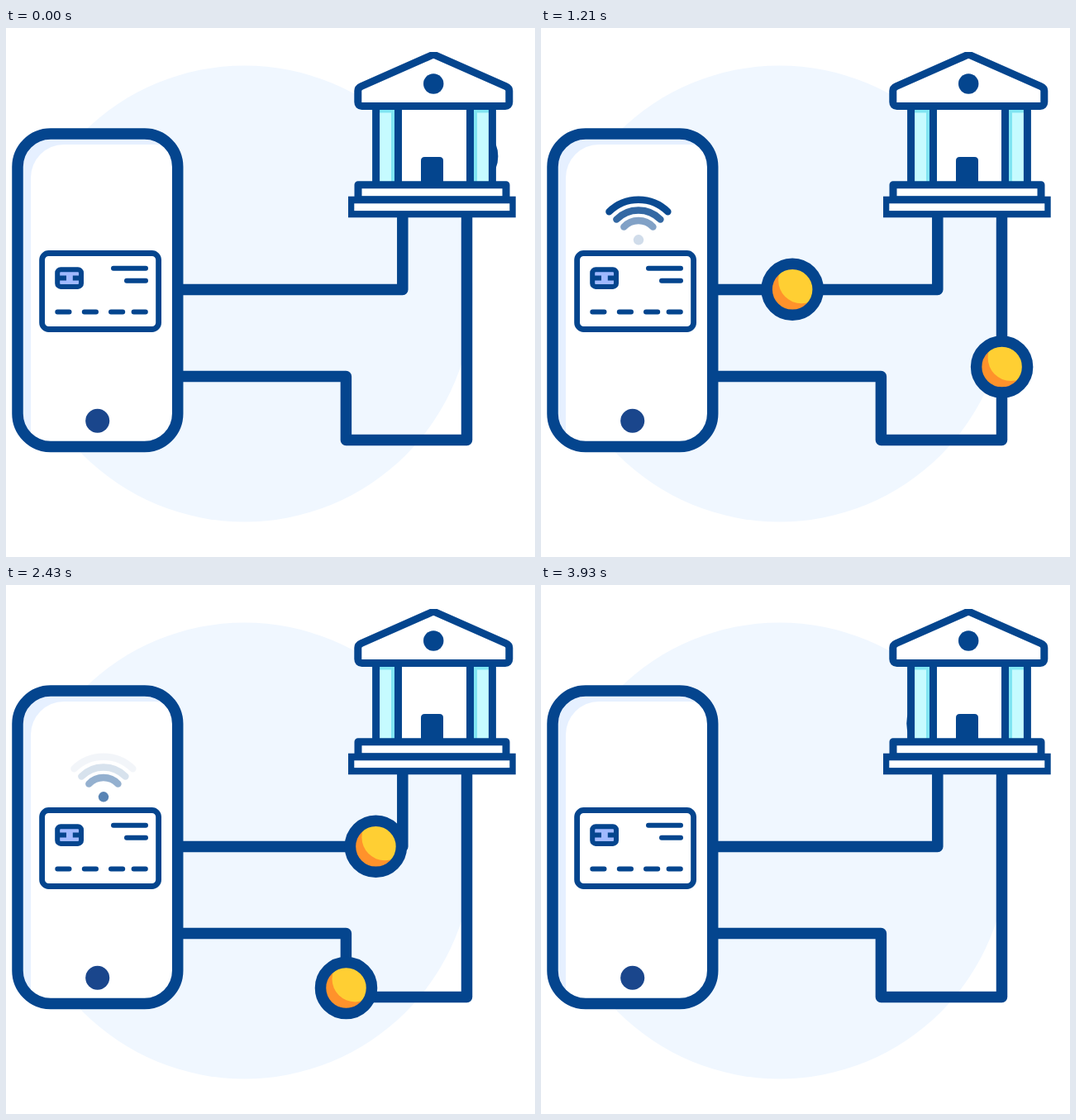
Write an HTML page that moves like this. It is 640 px wide and 640 px high and loops after 4000 ms.

```html
<!DOCTYPE html>
<html lang="en">
<head>
<meta charset="utf-8">
<title>Card payment</title>
<style>
  html, body { margin: 0; width: 100%; height: 100%; overflow: hidden; background: #fff; }
  svg { display: block; width: 100vw; height: 100vh; }
  .line { fill: none; stroke: #04458e; stroke-linejoin: round; }
  .white { fill: #fff; }
  .navy { fill: #04458e; }
  .cap { stroke-linecap: round; }
</style>
</head>
<body>
<svg viewBox="0 0 640 640">
  <defs>
    <clipPath id="face"><circle r="25"/></clipPath>
    <clipPath id="roof"><path d="M414 29H620V110H414Z"/></clipPath>
    <g id="coin">
      <circle r="25" fill="#ff922b"/>
      <circle cx="11" cy="-11" r="28" fill="#ffcf33" clip-path="url(#face)"/>
      <circle r="31" class="line" stroke-width="13.5"/>
    </g>
  </defs>

  <circle cx="288.5" cy="321.5" r="276" fill="#f0f7ff"/>

  <g class="line" stroke-width="13.5">
    <path d="M200 316.4H479.8V200"/>
    <path d="M200 421.4H411.4V498.6H557.5V200"/>
  </g>

  <use id="pay" href="#coin"/>
  <use id="receipt" href="#coin"/>

  <g id="phone">
    <rect x="14" y="128" width="193.7" height="378.5" rx="40" fill="#e6f0ff"/>
    <path class="white" d="M30 500V181A40 40 0 0 1 70 141H180Q207 141 207 172V466A40 40 0 0 1 168 506H54Z"/>
    <rect class="line" x="14" y="128" width="193.7" height="378.5" rx="40" stroke-width="13.5"/>
    <circle cx="110.7" cy="475.3" r="14.5" fill="#1a468c"/>
  </g>

  <g id="wifi" class="line cap" stroke-width="8.4">
    <circle cx="118" cy="256.3" r="6.2" class="navy" stroke="none"/>
    <path d="M100.3 240.6A24.2 24.2 0 0 1 135.5 240.6"/>
    <path d="M91.3 231.6A37.4 37.4 0 0 1 144.5 231.6"/>
    <path d="M82.4 222.2A50.7 50.7 0 0 1 153.4 222.2"/>
  </g>

  <g id="card">
    <rect x="43.6" y="272.5" width="141" height="92" rx="8" class="line" style="fill:#fff" stroke-width="6.8"/>
    <rect x="62.2" y="292.3" width="28.8" height="20.6" rx="4" class="line" style="fill:#a0b9ff" stroke-width="6"/>
    <path class="line" stroke-width="6" d="M64 302.6H73M80.8 302.6H89"/>
    <path class="line cap" stroke-width="6" d="M130 290.8H169M146 305.7H169M62.3 343.5H76.5M94.8 343.5H109M127 343.5H141.2M154.6 343.5H168.8"/>
  </g>

  <g id="bank">
    <rect class="white" x="447" y="94" width="142" height="96"/>
    <path fill="#80e5f2" d="M450 98H472V188H450ZM564 98H586V188H564Z"/>
    <path fill="#c6fbff" d="M450 102.5H466V188H450ZM570 102.5H586V188H570Z"/>
    <path class="line" stroke-width="9" d="M447.6 96V188M474.5 96V188M561.5 96V188M588.4 96V188"/>
    <path class="navy" d="M502 188V160.5Q502 156 506.500 156H524.5Q529 156 529 160.500V188Z"/>
    <g clip-path="url(#roof)">
      <path class="line" style="fill:#fff" stroke-width="9" d="M517.200 32L430 70.500Q425.800 72.500 425.800 76V89.500Q425.800 94.500 430.500 94.500H604Q608.800 94.500 608.800 89.500V76Q608.800 72.500 604.500 70.500Z"/>
    </g>
    <circle class="navy" cx="517.2" cy="67.500" r="12.2"/>
    <rect x="426" y="189.700" width="179" height="18" class="line" style="fill:#fff" stroke-width="9"/>
    <rect class="navy" x="414" y="203.700" width="202.700" height="25.600"/>
    <rect class="white" x="421.300" y="212.300" width="188" height="8.800"/>
  </g>
</svg>

<script>
  const LOOP = 4000, SHOT = 500 / 7, TICK = 40, PULSE = 2000;
  const $ = id => document.getElementById(id);

  // Each coin runs along its corners at constant speed (px per ms).
  const coins = [
    { el: $('pay'), speed: 0.1194, path: [[156.1, 316.3], [480, 316.3], [480, 150]] },
    { el: $('receipt'), speed: 0.2055, path: [[557.6, 155.2], [557.6, 499], [411.5, 499], [411.5, 422], [140, 422]] }
  ];

  // Rise start, peak and fall end of each signal part, in ms.
  const waves = [[0, 720, 1440], [80, 880, 1600], [240, 1040, 1760], [300, 1340, 1940]];
  const bars = [...$('wifi').children];

  const smooth = (a, b, t) => {
    const u = Math.min(1, Math.max(0, (t - a) / (b - a)));
    return u * u * (3 - 2 * u);
  };

  function along(path, dist) {
    for (let i = 1; i < path.length; i++) {
      const [x, y] = path[i - 1], [X, Y] = path[i];
      const len = Math.hypot(X - x, Y - y);
      if (dist <= len) return [x + (X - x) * dist / len, y + (Y - y) * dist / len];
      dist -= len;
    }
    return path[path.length - 1];
  }

  function draw(t) {
    for (const { el, speed, path } of coins) {
      el.setAttribute('transform', `translate(${along(path, speed * t)})`);
    }
    waves.forEach(([start, peak, end], i) => {
      const p = t % PULSE;
      bars[i].style.opacity = smooth(start, peak, p) - smooth(peak, end, p);
    });
  }

  // Poses are held 14 times a second and snap up to the 40 ms tick.
  function frame(now) {
    const shot = Math.floor(((now - begin + 4) % LOOP) / SHOT);
    draw(Math.ceil(shot * SHOT / TICK - 1e-6) * TICK);
    requestAnimationFrame(frame);
  }

  const begin = performance.now();
  draw(0);
  requestAnimationFrame(now => frame(Math.max(now, begin)));
</script>
</body>
</html>
```
